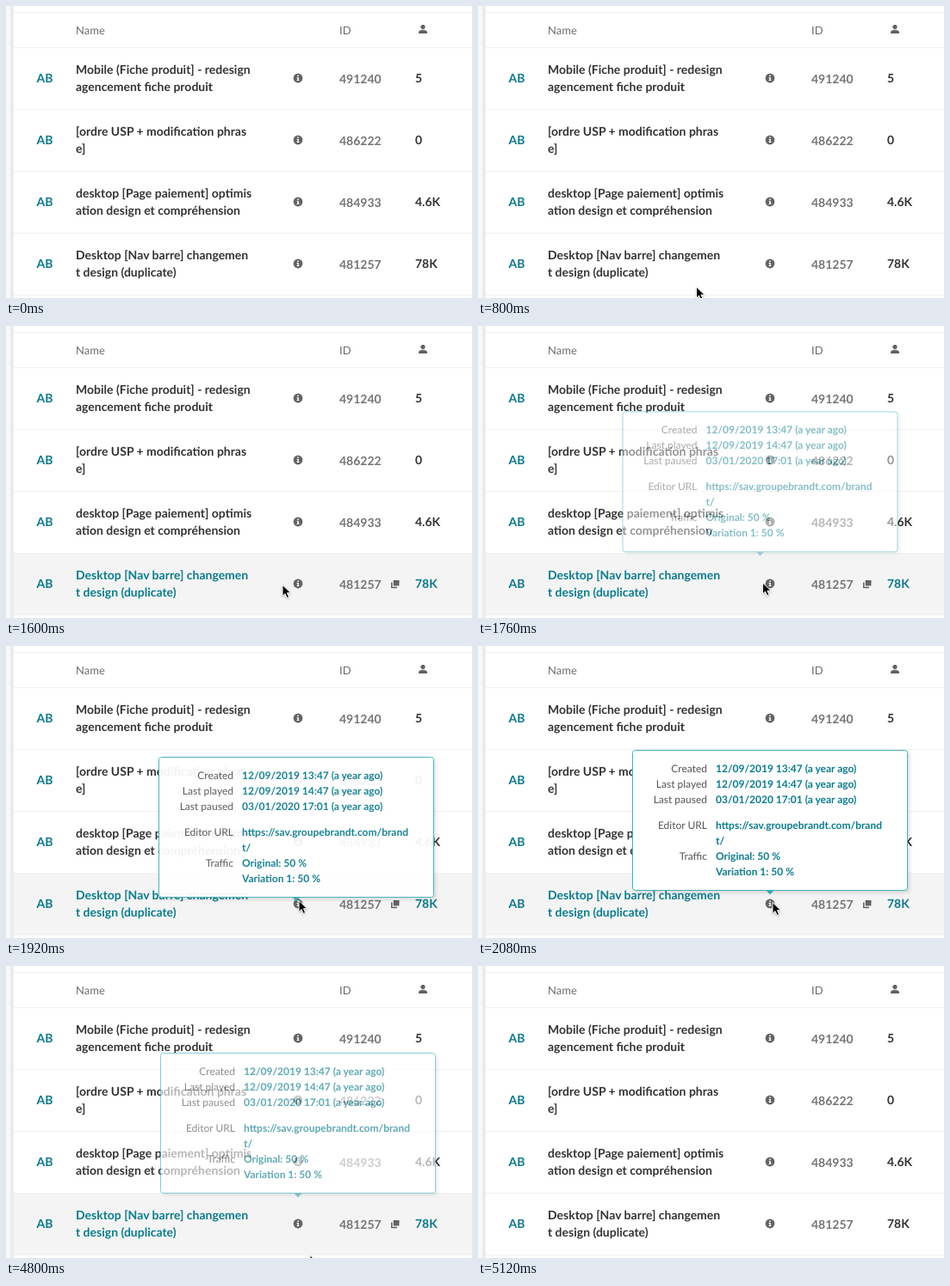
Write an HTML page that moves like this. It is 541 px wide and 340 px high and loops after 5.76 s.

```html
<!DOCTYPE html>
<html lang="fr">
<head>
<meta charset="utf-8">
<style>
  html, body { margin: 0; width: 100%; height: 100%; overflow: hidden; background: #fff; }
  svg { display: block; width: 541px; height: 340px; font: bold 14px Lato, sans-serif; text-rendering: geometricPrecision; }
  .teal, .hover .hot { fill: #0b7b8c; }
  .dark { fill: #333; }
  .id { fill: #757575; }
  .head { font-weight: normal; font-size: 13px; fill: #6e6e6e; }
  .icon { fill: #636363; }
  .line { fill: #f1f1f1; }
  .bg, .copy { visibility: hidden; }
  .hover .bg, .hover .copy { visibility: visible; }
  #tip { font-size: 12px; }
  #tip rect { filter: drop-shadow(2px 2px 2px #0002); }
  #cursor { filter: drop-shadow(0 1px 1px #0004); }
  .label { font-weight: normal; fill: #555; text-anchor: end; }
</style>
</head>
<body>
<svg viewBox="0 0 541 340">
  <path fill="#f8f8f8" d="M0 0h5v340H0z"/>
  <path fill="#ececec" d="M5 0h4v340H5z"/>
  <path class="line" d="M9 7h532v1H9z"/>
  <text class="head" x="81" y="33">Name</text>
  <text class="head" x="387" y="33">ID</text>
  <g class="icon"><circle cx="484" cy="24.3" r="2.6"/><path d="M479 32v-1.5c0-2 2.5-2.8 5-2.8s5 .8 5 2.8V32z"/></g>
  <g id="rows"></g>
  <g id="tip">
    <path fill="#45b0bb" d="M334 284h10l-5 5.5z"/>
    <rect x="179.5" y="121.5" width="319" height="163" rx="3" fill="#fff" stroke="#45b0bb"/>
  </g>
  <path id="cursor" stroke="#fff" d="M0 0V13L3 10.2 5.2 15 7.6 14 5.4 9.3H9.5Z"/>
</svg>
<script>
const $ = id => document.getElementById(id);
const text = (cls, x, y, s) => `<text class="${cls}" x="${x}" y="${y}">${s}</text>`;

const rows = [
  ['Mobile (Fiche produit] - redesign', 'agencement fiche produit', 491240, '5'],
  ['[ordre USP + modification phras', 'e]', 486222, '0'],
  ['desktop [Page paiement] optimis', 'ation design et compréhension', 484933, '4.6K'],
  ['Desktop [Nav barre] changemen', 't design (duplicate)', 481257, '78K']
];
$('rows').innerHTML = rows.map(([a, b, id, count], i) => `
  <g transform="translate(0 ${48 + i * 72})">
    <path class="bg" fill="#f4f4f4" d="M9 0h532v73H9z"/>
    <path class="line" d="M9 0h532v1H9zM9 72h532v1H9z"/>
    ${text('teal', 35.5, 41, 'AB')}
    ${text('dark hot', 81, 31, a)}${text('dark hot', 81, 51, b)}
    <circle class="icon" cx="339" cy="36" r="5.4"/>
    <path fill="#fff" d="M338.2 32.6h1.6v1.5h-1.6zM337.6 35h2.2v3h.7v1.1h-2.9V38h.7v-1.9h-.7z"/>
    ${text('id', 387, 42, id)}
    <path class="icon copy" d="M449.7 32h6.8v6.6h-6.8zM447 34.5h1.5v5.3h5.5v1.5h-7z"/>
    ${text('dark hot', 475, 41, count)}
  </g>`).join('');
const target = $('rows').lastElementChild;

const info = [
  ['Created', '12/09/2019 13:47 (a year ago)'],
  ['Last played', '12/09/2019 14:47 (a year ago)'],
  ['Last paused', '03/01/2020 17:01 (a year ago)'],
  ['Editor URL', 'https://sav.groupebrandt.com/brand'],
  ['', 't/'],
  ['Traffic', 'Original: 50 %'],
  ['', 'Variation 1: 50 %']
];
$('tip').innerHTML += info.map(([label, value], i) => {
  const y = 147 + i * 18 + (i > 2 ? 12 : 0);
  return text('label', 266, y, label) + text('teal', 276, y, value);
}).join('');

const LOOP = 5760, STEP = 160, REST = 342;
const ramp = (t, from, to) => Math.min(1, Math.max(0, (t - from) / (to - from)));
const smooth = u => u * u * (3 - 2 * u);

// Cursor stops: time, x, y
const stops = [
  [640, 250, 344], [960, 257, 310], [1440, 257, 310], [1600, 321, 301.5],
  [1920, 340, 296.5], [2080, REST, 298.5], [4640, REST, 298.5], [4960, 364, 375]
];
function cursorAt(t) {
  const i = stops.findIndex(s => s[0] > t);
  if (i < 1) return [250, 360];
  const [t0, x0, y0] = stops[i - 1], [t1, x1, y1] = stops[i];
  const u = ramp(t, t0, t1);
  return [x0 + (x1 - x0) * u, y0 + (y1 - y0) * u];
}

function draw(now) {
  const t = Math.floor(now % LOOP / STEP) * STEP;
  const [x, y] = cursorAt(t);
  $('cursor').setAttribute('transform', `translate(${x} ${y})`);
  target.classList.toggle('hover', t >= 1600 && t < 4960);

  // The tooltip drops in with a small bounce, then fades upwards
  const enter = ramp(t, 1680, 2080), leave = smooth(ramp(t, 4640, 5040));
  const dx = enter < 1 ? x - REST : 0;
  const dy = -36 * (1 - enter) * Math.cos(3.6 * enter) - 57 * leave;
  $('tip').setAttribute('opacity', (1 - (1 - enter) ** 3) * (1 - leave));
  $('tip').setAttribute('transform', `translate(${dx} ${dy})`);
}

let start;
function tick(now) {
  start ??= now;
  draw(now - start);
  requestAnimationFrame(tick);
}
draw(0);
requestAnimationFrame(tick);
</script>
</body>
</html>
```
